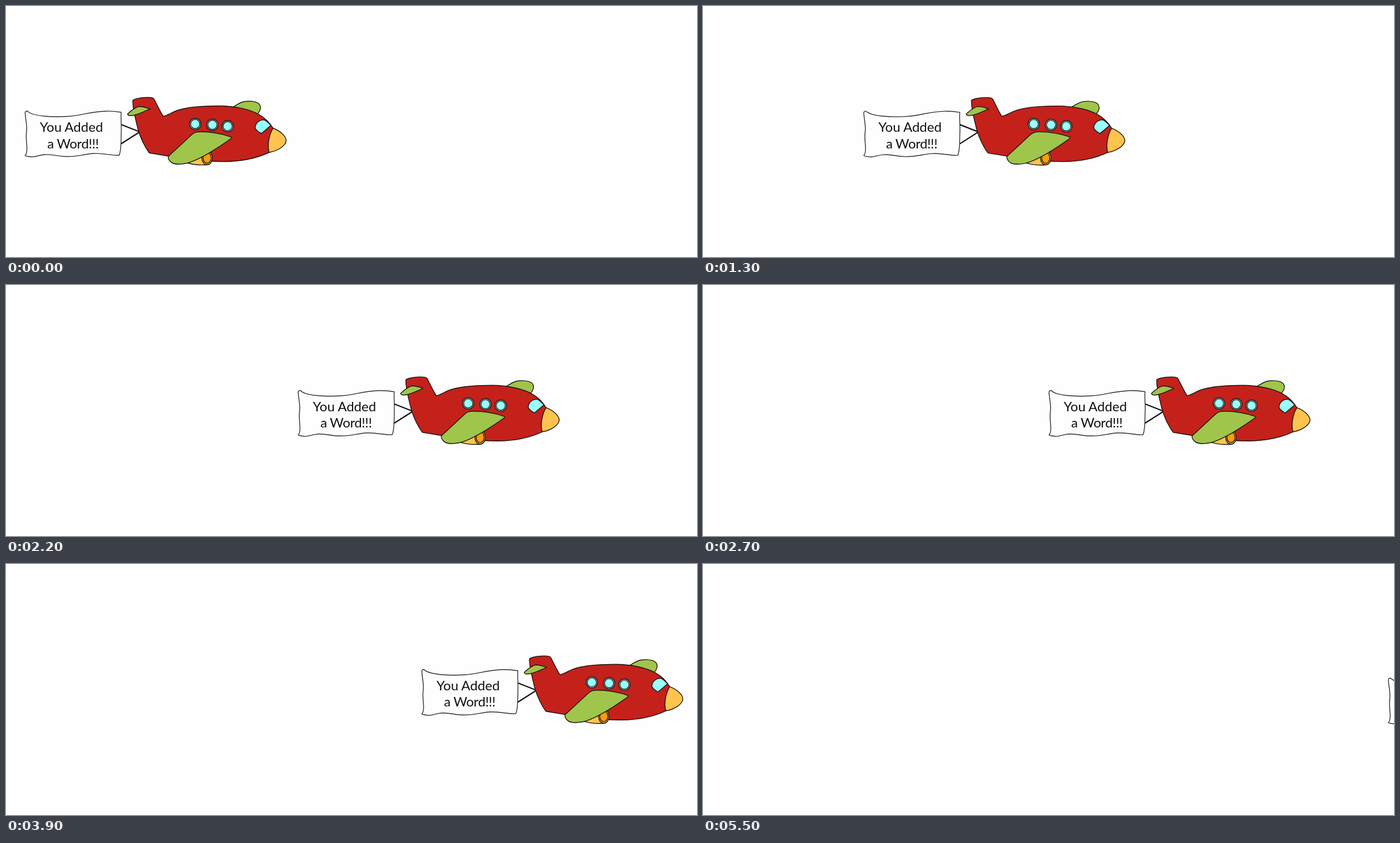
Recreate the animation shown at these times as an HTML page. Size 1242 px wide and 451 px high, loop 5700 ms.

```html
<!DOCTYPE html>
<html lang="en">
<head>
<meta charset="utf-8">
<title>You Added a Word</title>
<style>
  html, body { margin: 0; width: 100%; height: 100%; overflow: hidden; background: #fefefe; }
  svg { display: block; width: 1242px; height: 451px; }
  .ink { stroke: #15120f; stroke-width: 1.4; stroke-linejoin: round; }
  .red { fill: #c4211b; }
  .green { fill: #9fc54a; }
  .yellow { fill: #ffc44d; }
  .orange { fill: #ff9d0a; }
  .glass { fill: #9ff; }
  .rim { fill: #d8f4f4; }
  .rope { fill: none; stroke: #111; stroke-width: 2.3; }
  .cloth { fill: #fefefe; stroke: #2a2a2a; stroke-width: 1.4; stroke-linejoin: round; }
  text { font: 24px Lato, "Open Sans", sans-serif; text-anchor: middle; fill: #111; }
</style>
</head>
<body>
<svg viewBox="0 0 1242 451">
  <g id="plane">
    <path class="rope" d="M207 213L240 226M207 247.5L240 226.5"/>
    <path class="cloth" d="M34.5 191C35.5 188 38 188 41 191C52 198 82 200 110 198.5C135 197 150 190 180 189C192 188.5 201 190 207 191C206 205 208 215 207 230C207 245 206 262 203.5 268C195 270 175 264 158 265C140 266 130 271 108 270.5C90 270 85 266 70 267C58 268 52 272 45 271C40 270.5 35 270 34.5 268.5C38 265 38 258 37.3 250C36.5 240 35.5 233 37 225C38.5 215 34 198 34.5 191Z"/>
    <text x="117.5" y="226">You Added</text>
    <text x="120.5" y="255.5" letter-spacing="-.4">a Word!!!</text>

    <path class="ink green" d="M407 182C418 176 422 172 430 171.5C443 170 458 172 457.5 183C457 188 455 191 451 195Z"/>
    <path class="ink red" d="M228 170C227 168 240 164.3 254 164.3C260 164.3 265 165 266 167C271 176 277 190 282.5 198C291 197 298 190 313 186C335 180 360 179.5 382 179.5C415 179.5 440 187 454 194.5C464 200 473 208 480 219.5L473 263C452 273 425 279 393 279.5C375 279.5 350 278 330 276L257.5 264C246 248 238 228 234 208C231 195 227.5 182 228 170Z"/>
    <path class="ink yellow" d="M480 219.5C492 224 504 234 503.5 242C503 252 486 261 473 263C469.5 252 472 232 480 219.5Z"/>
    <path class="ink green" d="M218.5 194C226 187 235 181 240 180.5C247 180.5 253 183 259 185C250 188 236 197 224 197C220 197 219 196 218.5 194Z"/>
    <path class="ink glass" d="M448 217C449 210 456 204 464 204.5C469 207 474 212 476 214.5C470 220 464 225 459 229C453 226 447 221 448 217Z"/>
    <g id="windows"></g>

    <path class="ink yellow" d="M326 282C335 285 350 286 362 285.5L369 262L345 262Z"/>
    <ellipse class="ink yellow" cx="361.5" cy="273" rx="9.5" ry="12.3"/>
    <ellipse class="ink orange" cx="361.5" cy="273" rx="7.3" ry="9.5"/>
    <path class="ink green" d="M292 270L333 232C338 227 342 226 350 226C370 226 392 231 404 235C406 236 405.5 237 404 238.5C385 252 350 276 325 282.5C313 285 300 285 295 279C292 275.5 291 272 292 270Z"/>
  </g>
</svg>
<script>
const LOOP = 5700, STEP = 100, LAST = 55;

// Flight path: [step, x, y], straight between points
const route = [
  [0, 0, 0], [12, 235, 0], [16, 313.3, 0.4], [18, 372.4, 0.8],
  [24, 550, 0.8], [25, 571.5, 0.8], [36, 659.6, 0.8], [37, 667.5, 0.8],
  [39, 713, 0.8], [41, 760, -8], [42, 785, 0], [44, 850, 10],
  [47, 946.4, 10.4], [48, 982, 10.4], [54, 1177, 16], [55, 1197.5, 16.3]
];

const plane = document.getElementById("plane");

document.getElementById("windows").innerHTML =
  [[340, 212], [371, 213.5], [398.5, 216]].map(([x, y]) =>
    `<circle class="ink rim" cx="${x}" cy="${y}" r="10.3"/>` +
    `<circle class="ink glass" cx="${x}" cy="${y}" r="8.2"/>`).join("");

function position(step) {
  const i = Math.max(1, route.findIndex(p => p[0] >= step));
  const [s0, x0, y0] = route[i - 1], [s1, x1, y1] = route[i];
  const k = (step - s0) / (s1 - s0);
  return [x0 + (x1 - x0) * k, y0 + (y1 - y0) * k];
}

function draw(ms) {
  const step = Math.min(LAST, Math.floor((ms % LOOP) / STEP));
  plane.setAttribute("transform", `translate(${position(step)})`);
}

const start = performance.now();
function tick() {
  draw(performance.now() - start);
  requestAnimationFrame(tick);
}
tick();
</script>
</body>
</html>
```
